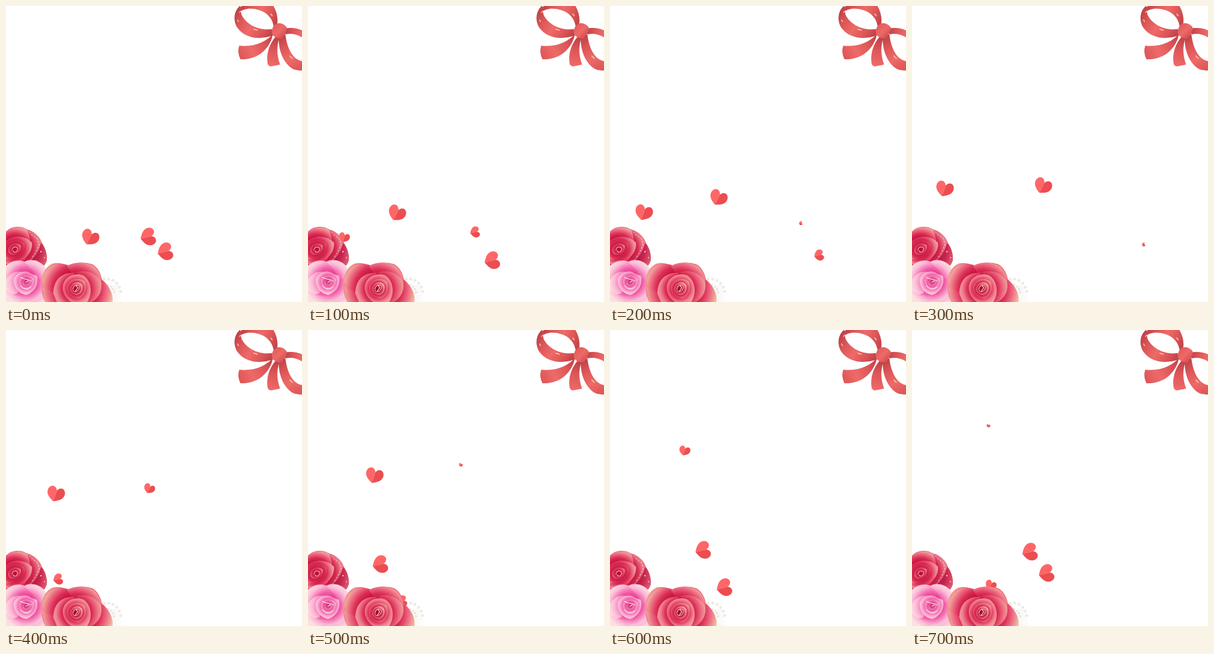
Write an HTML page with a canvas that moves like this. It is 500 by 500 pixels and loops after 0.8 s.

```html
<!DOCTYPE html>
<html lang="en">
<head>
<meta charset="utf-8">
<title>Roses and hearts</title>
<style>
html, body { margin: 0; width: 100%; height: 100%; overflow: hidden; background: #fff; }
canvas { display: block; width: 100vw; height: 100vh; }
</style>
</head>
<body>
<canvas id="stage" width="500" height="500"></canvas>
<script>
const ctx = document.getElementById('stage').getContext('2d');
const STEP = 100, STEPS = 8;
const SCALE = [0.22, 0.63, 1, 1, 1, 1, 0.63, 0.22];

// Each heart lives for one whole loop, starting at its own step.
const hearts = [
  { start: 6, angle: 27, path: [[113,473],[133,431],[142,391],[150,350],[183,324],[221,304],[242,268],[258,228]] },
  { start: 3, angle: 77, path: [[55,447],[88,421],[122,396],[157,372],[199,375],[240,390],[282,382],[322,367]] },
  { start: 4, angle: 76, path: [[125,473],[159,458],[193,435],[227,411],[269,415],[311,430],[353,421],[391,403]] },
  { start: 0, angle: 19, path: [[51,432],[61,391],[57,349],[55,309],[84,277],[112,246],[126,204],[129,162]] }
];

const leftHalf = new Path2D('M0 13C-6 10-15 6-15-3C-14.5-13-4-15.5 0-6Z');
const rightHalf = new Path2D('M0 13C6 10 15 6 15-3C14.5-13 4-15.5 0-6Z');

let art;

function layer(...painters) {
  const c = document.createElement('canvas');
  c.width = c.height = 500;
  art = c.getContext('2d');
  painters.forEach(p => p());
  return c;
}

function fill(d, gradient, colors) {
  colors.forEach((c, i) => gradient.addColorStop(i / (colors.length - 1), c));
  art.fillStyle = gradient;
  art.fill(new Path2D(d));
}

function shape(d, line, ...colors) {
  fill(d, art.createLinearGradient(...line), colors);
}

// Petals shade outwards from the heart of the flower.
function petalsAt(x, y) {
  return (d, r0, r1, ...colors) =>
    fill(d, art.createRadialGradient(x, y, r0, x, y, r1), colors);
}

function stroke(d, color, width = 1) {
  art.strokeStyle = color;
  art.lineWidth = width;
  art.stroke(new Path2D(d));
}

function dot(x, y, r, color) {
  art.fillStyle = color;
  art.beginPath();
  art.arc(x, y, r, 0, 7);
  art.fill();
}

function ribbon() {
  const lit = '#ee6a68', mid = '#de5759', deep = '#bd4146';
  // tails
  shape('M451 47C440 60 420 70 394 67Q390 78 396 90C420 91 440 79 449 55Z', [393, 80, 452, 50], mid, lit, mid, deep);
  shape('M456 51C445 64 439 80 442 98Q444 102 448 102L463 99C457 82 457 68 462 54Z', [446, 100, 458, 52], lit, mid, deep);
  // left loop
  shape('M394 12C393 5 397 0 403-3L450-3C457 8 460 19 458 31L452 34C450 21 441 11 428 7C416 3 403 4 397 9Z', [395, 4, 458, 30], deep, mid, lit, mid, deep);
  shape('M395 0C385 8 383 25 391 37C404 55 430 58 452 49L449 39C426 42 407 31 399 17C397 13 396 8 399 4Z', [388, 8, 450, 48], deep, mid, lit, mid, deep);
  // right loop
  shape('M471 38C481 36 491 37 500 41L500 53C490 47 481 46 472 48Z', [471, 42, 500, 46], deep, mid, lit);
  shape('M461 50C459 73 468 96 484 106C490 109 496 109 500 109L500 93C486 91 475 74 472 48Z', [462, 52, 494, 106], deep, mid, lit, mid);
  // knot
  shape('M454 32C460 26 470 30 474 36C475 43 471 49 465 55C458 55 451 52 449 46C449 40 450 35 454 32Z', [452, 34, 470, 52], '#e25d5d', lit, '#d14c50');
  stroke('M391 23L393 27M418 39L425 41M479 84L484 89M447 13L450 17M394 11L398 8', '#f8d3b0', 1.5);
}

function lace() {
  shape('M160 478L188 470L197 500L160 500Z', [165, 488, 197, 490], '#f4f2ef', '#fefdfd');
  for (let i = 0; i < 6; i++) {
    const a = -1.75 + i * 0.32;
    dot(170 + 24 * Math.cos(a), 486 + 25 * Math.sin(a), 2.5, '#eeeae5');
  }
  for (let i = 0; i < 4; i++) {
    const a = -1.3 + i * 0.36;
    dot(169 + 14 * Math.cos(a), 487 + 16 * Math.sin(a), 1.7, '#e6e1da');
  }
}

const dark = '#c4123f', red = '#dc2f56', rose = '#ee7085', peach = '#efc0a2';

function redRose() {
  const petal = petalsAt(14, 411);
  petal('M0 381C8 373 18 372 28 374L37 378C48 381 58 391 61 401C67 409 70 421 69 430L65 438L0 440Z', 14, 56, dark, red, rose, '#cd2f56', '#d9566c');
  petal('M0 382C10 372 26 372 36 379C43 385 46 392 46 400C34 389 15 388 0 397Z', 20, 40, dark, red, rose, peach);
  petal('M35 377C48 380 58 391 61 402C54 418 43 429 27 437C41 418 45 397 35 377Z', 24, 50, dark, '#d32a50', rose, '#e59a90');
  petal('M59 400C68 410 71 424 67 435C56 438 44 437 33 436C48 427 56 415 59 400Z', 30, 60, '#a90f38', '#c92850', '#df6a78');
  petal('M0 397C12 386 33 388 44 400C45 417 32 431 10 436L0 436Z', 10, 36, '#b30f3b', red, '#f08b97', '#f2b5a6');
  petal('M0 402C10 393 24 394 31 402C34 415 22 428 0 428Z', 8, 24, dark, red, '#f6aaa8');
  petal('M4 410C7 400 19 399 25 405C26 415 18 422 9 420C5 418 3 415 4 410Z', 2, 14, '#b0123c', red, '#f7c4b4');
  stroke('M10 413C11 405 19 406 20 411C18 417 13 417 12 413', '#f3a6a3', 1.2);
  art.setLineDash([3, 2.5]);
  stroke('M36 377L43 386L53 393L56 403L50 416L43 426', '#fbe9ea', 0.9);
  art.setLineDash([]);
  dot(59, 415, 1.2, '#fbd6d9');
  dot(65, 425, 1, '#fbd6d9');
}

function pinkRose() {
  const petal = petalsAt(34, 466);
  const hot = '#e8388f', pink = '#f573b3', pale = '#fbb9d6', edge = '#fddfe2';
  petal('M0 439C9 430 22 428 31 432C40 426 54 430 60 435C67 440 70 449 66 458L68 500L0 500Z', 16, 46, hot, pink, pale, edge);
  petal('M0 441C12 429 29 431 37 442C26 445 12 454 0 468Z', 18, 42, hot, pink, pale, edge);
  petal('M31 433C44 426 61 433 67 445C65 456 61 464 54 469C53 454 44 444 31 433Z', 14, 40, hot, pink, pale, edge);
  petal('M0 463C6 451 18 446 30 450L20 484C12 490 5 486 0 481Z', 8, 36, hot, pink, pale, edge);
  petal('M54 460C63 459 67 466 66 477C64 490 54 498 40 500L27 500C42 492 51 480 54 460Z', 16, 40, hot, pink, pale, edge);
  petal('M0 479C11 490 25 493 43 484C38 495 29 500 18 500L0 500Z', 16, 40, hot, pink, pale, edge);
  petal('M13 461C20 447 35 446 42 452L52 456C56 472 47 484 34 488C21 486 12 474 13 461Z', 8, 24, hot, pink, pale, '#fdd3e4');
  petal('M22 463C27 453 42 453 47 462C47 473 41 480 33 479C26 477 21 471 22 463Z', 4, 15, '#d9267c', pink, '#fddbe7');
  petal('M28 465C32 459 41 461 41 467C40 473 32 474 28 470Z', 1, 8, '#c9206a', '#f6a3bf');
  stroke('M24 458C31 463 37 460 43 465M24 472C29 479 37 480 42 474M33 467L38 464', '#fff1f5', 1.1);
}

function bigRose() {
  const petal = petalsAt(118, 478);
  petal('M60 464C62 448 69 439 79 435C88 433 98 436 106 438C117 433 132 432 145 436C154 440 160 451 162 462C173 471 181 484 180 500L66 500C61 489 58 476 60 464Z', 26, 66, dark, red, rose, peach);
  petal('M62 463C67 445 79 434 92 436C104 438 111 445 115 452C97 452 84 466 80 488C68 482 61 474 62 463Z', 30, 60, dark, red, rose, peach);
  petal('M103 439C120 430 142 433 151 442C159 451 163 461 160 469C151 457 134 450 112 453Z', 24, 52, dark, red, rose, peach);
  petal('M161 463C173 472 182 486 180 500L135 500C153 492 161 479 161 463Z', 30, 64, dark, red, rose, peach);
  petal('M61 473C70 481 83 485 91 485L104 500L66 500Z', 26, 60, dark, red, rose, peach);
  petal('M117 450C138 443 157 455 161 468C163 483 155 494 145 500L132 500C146 482 139 463 117 450Z', 18, 46, '#b80f3b', red, rose, '#efb09f');
  petal('M80 486C80 462 95 449 117 451C103 461 98 479 109 500L86 500Z', 16, 42, '#b80f3b', red, '#f08493', '#f0a39c');
  petal('M96 473C99 456 117 450 130 455C143 462 148 484 137 500L110 500C101 494 95 484 96 473Z', 9, 29, '#b00e39', red, '#f0808f', '#f3aaa0');
  petal('M103 474C107 460 124 457 133 466C138 479 132 491 122 494C110 493 102 485 103 474Z', 6, 19, dark, red, '#f5a8a2');
  petal('M109 475C113 465 125 464 129 472C131 481 126 488 118 488C111 486 107 481 109 475Z', 2, 12, '#980e34', '#cf2850', '#f7c4b0');
  stroke('M113 479C114 469 124 470 124 475C123 482 116 485 113 480', '#f3aaa2', 1.2);
  stroke('M118 471L121 476L117 482', '#fbe3d3', 1.2);
}

function drawHeart({ start, angle, path }, step) {
  const age = (step - start + STEPS) % STEPS;
  const [x, y] = path[age];
  const k = SCALE[age];
  ctx.save();
  ctx.translate(x, y);
  ctx.rotate(angle * Math.PI / 180);
  ctx.scale(k, k);
  ctx.fillStyle = '#ff6667';
  ctx.fill(leftHalf);
  ctx.fillStyle = '#ec4d51';
  ctx.fill(rightHalf);
  ctx.restore();
}

const back = layer(ribbon, lace, redRose);
const front = layer(pinkRose, bigRose);

function frame() {
  const step = Math.floor(performance.now() / STEP) % STEPS;
  ctx.fillStyle = '#fff';
  ctx.fillRect(0, 0, 500, 500);
  ctx.drawImage(back, 0, 0);
  hearts.forEach(h => drawHeart(h, step));
  ctx.drawImage(front, 0, 0);
  requestAnimationFrame(frame);
}

frame();
</script>
</body>
</html>
```
